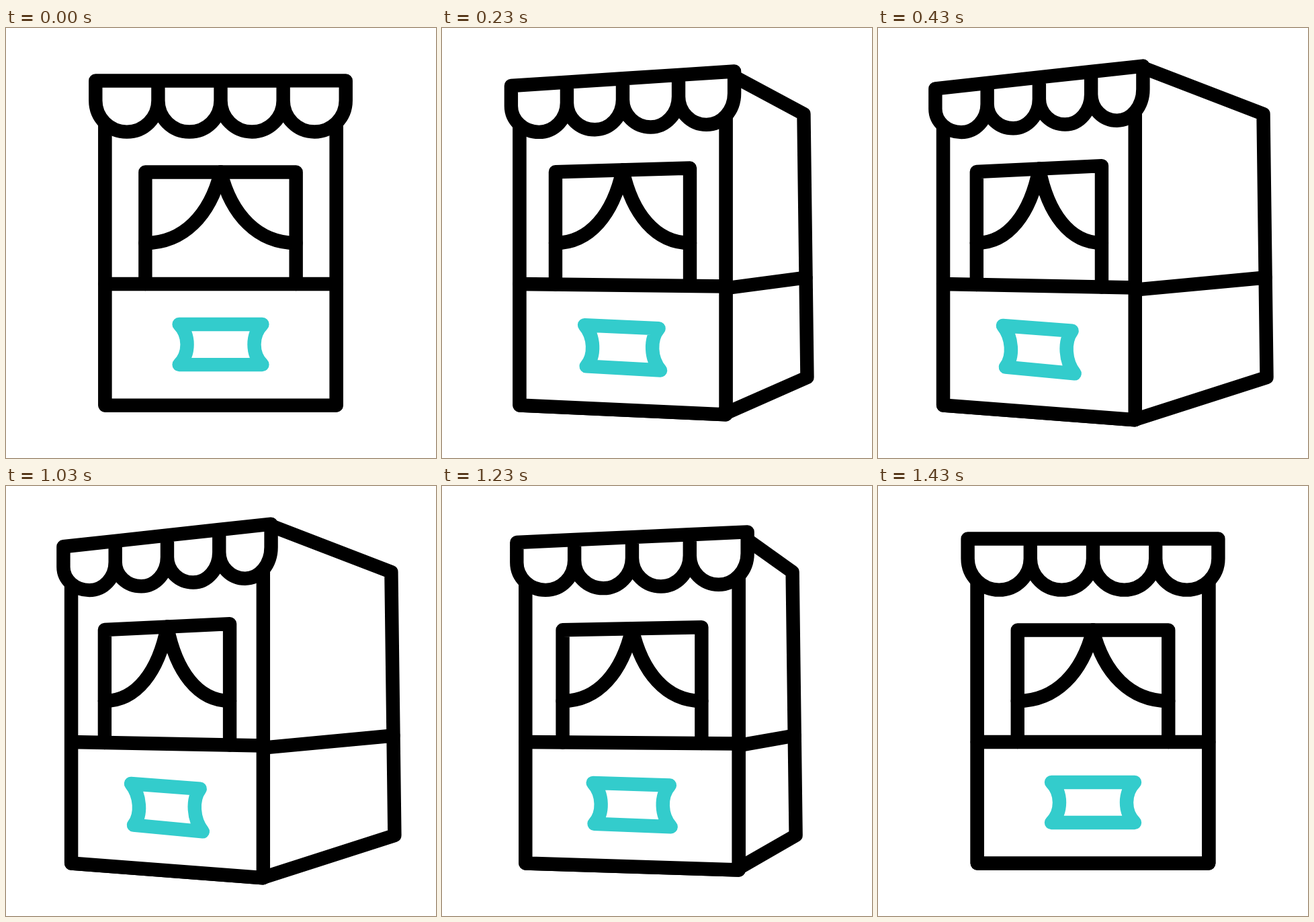
An HTML page with a canvas for the animation above (1.67 s loop, 640x640 px).

```html
<!DOCTYPE html>
<html lang="en">
<head>
<meta charset="utf-8">
<title>Ticket booth</title>
<style>
  html, body { margin: 0; width: 100%; height: 100%; overflow: hidden; background: #fff; }
  canvas { display: block; width: 100vw; height: 100vh; }
</style>
</head>
<body>
<canvas id="stage" width="640" height="640"></canvas>
<script>
const ctx = document.getElementById('stage').getContext('2d');
const LOOP = 1670, FRAME = 100 / 3;
const OPEN = { at: -0.58, length: 12.8 };   // in frames
const CLOSE = { at: 30.75, length: 11.9 };
const INK = '#000', TEAL = '#33cccc';
const MID = 320, LEFT = MID - 172.25, RIGHT = MID + 172.25;
const EYE = 320, BELT = 381, FLOOR = 561.5;
let turn = 0;

// A point of the front face. Turning narrows it and tilts it away from eye level;
// dx and dy are extra shifts when fully turned.
function face(x, y, dx = 0, dy = 0) {
  const across = (x - LEFT) / (RIGHT - LEFT);
  const tilt = (y - EYE) * (y < EYE ? 0.129 : 0.09);
  return [
    x + (0.829 * x - 25.4 + dx - x) * turn,
    y + (tilt * across + dy) * turn
  ];
}

// A point of the far edge of the side wall.
const farEdge = y => [477 + (y - 128) * 0.0128 + 96.5 * turn, y];

const between = (a, b, f) => a.map((v, i) => v + (b[i] - v) * f);

function smooth(u) {
  const s = Math.min(1, Math.max(0, u));
  return s * s * (3 - 2 * s);
}

function stroke(...points) {
  ctx.beginPath();
  points.forEach(p => ctx.lineTo(...p));
  ctx.stroke();
}

function drawSide() {
  const top = farEdge(128), low = farEdge(520);
  ctx.save();
  ctx.beginPath();
  ctx.rect(0, 0, 481 + 122 * turn, 640);
  ctx.clip();
  stroke(between(face(RIGHT, 85), top, 0.06), top, low, face(RIGHT, 557, 0, 4.5));
  stroke(face(RIGHT, BELT + 2, 0, 1), farEdge(371.5));
  ctx.restore();
}

function drawFront() {
  stroke(face(LEFT, 142), face(LEFT, FLOOR), face(RIGHT, FLOOR), face(RIGHT, 142));
  ctx.fill();
  ctx.stroke();
  stroke(face(LEFT, BELT), face(RIGHT, BELT));
}

function drawWindow() {
  const half = 112.25, top = 214.5, lift = 1.9;
  const l = MID - half, r = MID + half;
  stroke(face(l, BELT), face(l, top, 0, lift), face(r, top, 0, lift), face(r, BELT));

  const [x, y] = face(MID, top, 0, lift);
  for (const end of [l, r]) {
    const [hx, hy] = face(end, 320);
    const dx = hx - x, dy = hy - y;
    ctx.beginPath();
    ctx.moveTo(x, y);
    ctx.bezierCurveTo(x + 0.14 * dx, y + 0.6 * dy, x + 0.49 * dx, hy, hx, hy);
    ctx.stroke();
  }
}

function drawAwning() {
  const k = 0.5523, width = 93.2;
  ctx.beginPath();
  for (let i = 0; i < 4; i++) {
    const l = MID + (i - 2) * width, r = l + width;
    const [lx, ly] = face(l, 108, 0, 11.5);
    const [rx, ry] = face(r, 108, 0, 11.5);
    const [mx, my] = face((l + r) / 2, 154.6, 0, 2.5);
    const half = (rx - lx) / 2;
    ctx.moveTo(...face(l, 78.5, 0, 10.5));
    ctx.lineTo(lx, ly);
    ctx.bezierCurveTo(lx, ly + k * (my - ly), mx - k * half, my, mx, my);
    ctx.bezierCurveTo(mx + k * half, my, rx, ry + k * (my - ry), rx, ry);
    ctx.lineTo(...face(r, 78.5, 0, 10.5));
    ctx.closePath();
  }
  ctx.fill();
  ctx.stroke();
}

function drawTicket() {
  const w = 62, h = 30, bite = 16;
  const at = (x, y) => face(MID + x, 471 + y, 0.067 * y - 0.6, 0.031 * x + 0.4);
  ctx.strokeStyle = TEAL;
  ctx.beginPath();
  for (const s of [1, -1]) {
    ctx.lineTo(...at(s * w, -s * h));
    ctx.bezierCurveTo(
      ...at(s * (w - bite), -s * (h - bite)),
      ...at(s * (w - bite), s * (h - bite)),
      ...at(s * w, s * h));
  }
  ctx.closePath();
  ctx.stroke();
}

function draw(now) {
  const t = now % LOOP;
  const step = Math.floor((Math.floor(t / 10) * 10 + 5) / FRAME);
  turn = smooth((step - OPEN.at) / OPEN.length) - smooth((step - CLOSE.at) / CLOSE.length);

  ctx.fillStyle = '#fff';
  ctx.fillRect(0, 0, 640, 640);
  ctx.lineWidth = 20.4;
  ctx.lineCap = ctx.lineJoin = 'round';
  ctx.strokeStyle = INK;
  drawSide();
  drawFront();
  drawWindow();
  drawAwning();
  drawTicket();
}

const start = performance.now();
function tick() {
  draw(performance.now() - start);
  requestAnimationFrame(tick);
}
tick();
</script>
</body>
</html>
```
